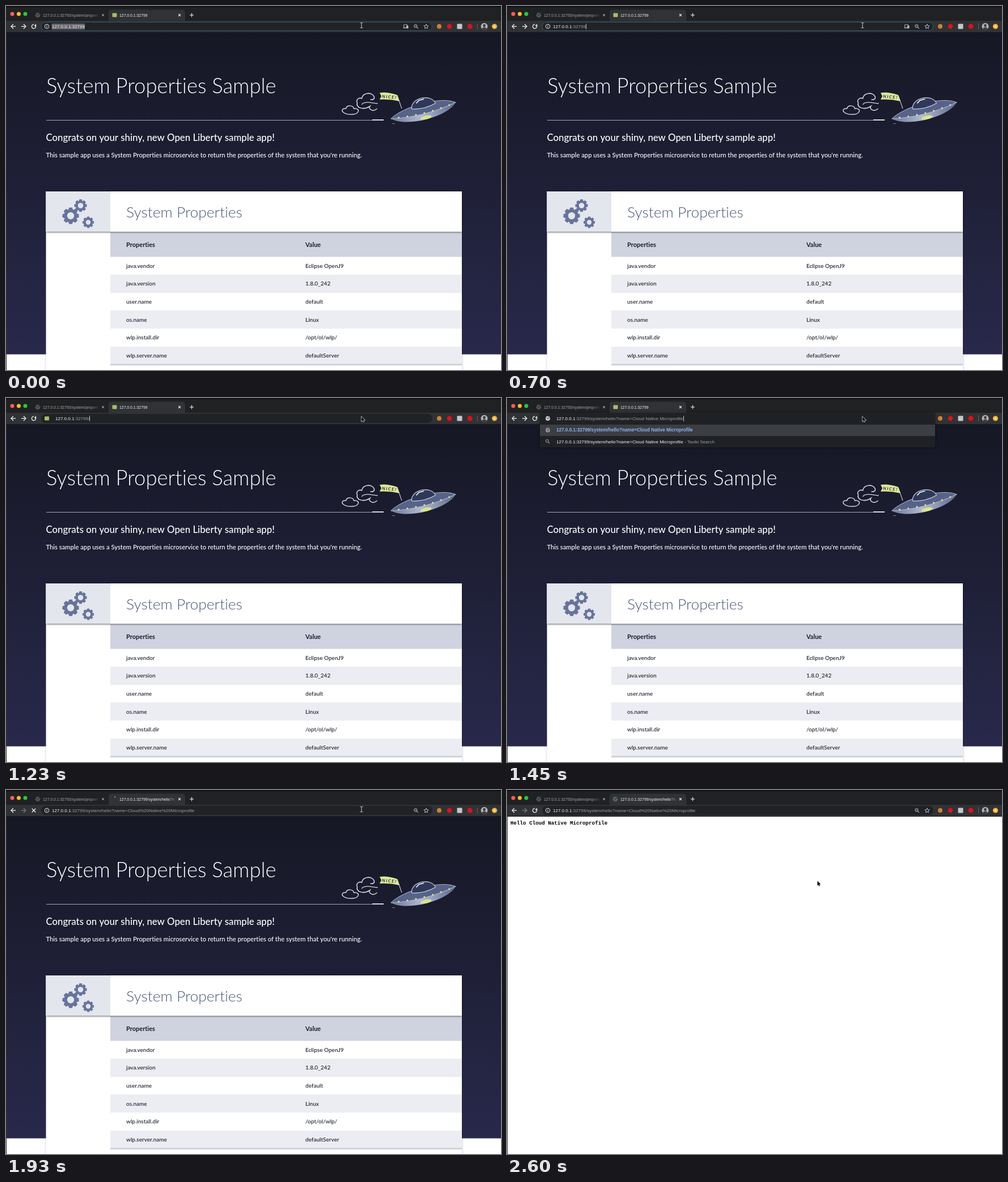
These frames come from a looping animation (873x642 px, 2650 ms). An HTML page with a canvas:

```html
<!DOCTYPE html>
<html lang="en">
<head>
<meta charset="utf-8">
<title>System Properties Sample</title>
<style>
  html, body { margin: 0; width: 100%; height: 100%; overflow: hidden; background: #fff; }
  canvas { display: block; }
</style>
</head>
<body>
<canvas id="stage" width="873" height="642"></canvas>
<script>
const W = 873, H = 642, LOOP = 2650;
const DESELECT = 680, SLASH = 1215, PASTE = 1440, ENTER = 1900, LOADED = 1950, DONE = 2100;
const MOVE_START = 2220, MOVE_END = 2570;
const HOST = '127.0.0.1', PORT = ':32799', PATH = '/system/hello?name=Cloud Native Microprofile';
const UI = '"Liberation Sans", Arial, sans-serif';
const BODY = 'Lato, "Open Sans", sans-serif';
const ctx = document.getElementById('stage').getContext('2d');
ctx.letterSpacing = '0.01px'; // turns ligatures off

function rect(x, y, w, h, color) {
  ctx.fillStyle = color;
  ctx.fillRect(x, y, w, h);
}

function pill(x, y, w, h, r, color) {
  ctx.beginPath();
  ctx.roundRect(x, y, w, h, r);
  ctx.fillStyle = color;
  ctx.fill();
}

function disc(x, y, r, color) {
  ctx.beginPath();
  ctx.arc(x, y, r, 0, Math.PI * 2);
  ctx.fillStyle = color;
  ctx.fill();
}

function ring(x, y, r, color, width = 1) {
  ctx.beginPath();
  ctx.arc(x, y, r, 0, Math.PI * 2);
  stroke(color, width);
}

function stroke(color, width = 1) {
  ctx.strokeStyle = color;
  ctx.lineWidth = width;
  ctx.stroke();
}

function line(points, color, width = 1) {
  ctx.beginPath();
  points.forEach(([x, y]) => ctx.lineTo(x, y));
  stroke(color, width);
}

// Draws a string and returns the x where it ends.
function text(str, x, y, font, color) {
  ctx.font = font;
  ctx.fillStyle = color;
  ctx.fillText(str, x, y);
  return x + ctx.measureText(str).width;
}

function fadeRight(x1, x2, color) {
  const g = ctx.createLinearGradient(x1, 0, x2, 0);
  g.addColorStop(0, color);
  g.addColorStop(1, color + '00');
  return g;
}

function cross(x, y, r, color, width) {
  line([[x - r, y - r], [x + r, y + r]], color, width);
  line([[x - r, y + r], [x + r, y - r]], color, width);
}

function globe(x, y, r, color, land) {
  disc(x, y, r, color);
  line([[x - r * .6, y - r * .3], [x, y], [x + r * .1, y + r * .6]], land, 1.1);
  line([[x + r * .2, y - r * .7], [x + r * .7, y - r * .1]], land, 1.1);
}

function magnifier(x, y, r, color) {
  ring(x - .7, y - .7, r, color, 1);
  line([[x + r * .5, y + r * .5], [x + r + 1.2, y + r + 1.2]], color, 1.1);
}

function star(x, y, r, color) {
  ctx.beginPath();
  for (let i = 0; i < 10; i++) {
    const a = -Math.PI / 2 + i * Math.PI / 5, d = i % 2 ? r * .45 : r;
    ctx.lineTo(x + d * Math.cos(a), y + d * Math.sin(a));
  }
  ctx.closePath();
  stroke(color, .9);
}

function navArrow(x, y, dir, color) {
  line([[x - 4 * dir, y], [x + 4 * dir, y]], color, 1.3);
  line([[x, y - 4], [x + 4 * dir, y], [x, y + 4]], color, 1.3);
}

function gear(x, y, r, hole) {
  ctx.save();
  ctx.translate(x, y);
  ctx.fillStyle = '#68739a';
  ctx.beginPath();
  ctx.arc(0, 0, r * .8, 0, Math.PI * 2);
  ctx.arc(0, 0, hole, 0, Math.PI * 2, true);
  ctx.fill();
  for (let i = 0; i < 8; i++) {
    ctx.beginPath();
    ctx.moveTo(-r * .27, -r * .72);
    ctx.lineTo(-r * .2, -r);
    ctx.lineTo(r * .2, -r);
    ctx.lineTo(r * .27, -r * .72);
    ctx.fill();
    ctx.rotate(Math.PI / 4);
  }
  ctx.restore();
}

function cloud() {
  ctx.save();
  ctx.translate(-1.5, 0);
  ctx.beginPath();
  ctx.moveTo(622, 187);
  ctx.bezierCurveTo(619, 193, 602, 192, 597, 188);
  ctx.bezierCurveTo(591, 184, 596, 180, 601, 181);
  ctx.bezierCurveTo(603, 174, 614, 175, 615, 181);
  ctx.bezierCurveTo(620, 180, 625, 183, 622, 187);
  stroke('#d4d6e2', 1.5);
  ctx.beginPath();
  ctx.moveTo(656, 181);
  ctx.bezierCurveTo(648, 188, 640, 181, 643, 177);
  ctx.bezierCurveTo(630, 185, 618, 178, 621, 171);
  ctx.bezierCurveTo(618, 165, 624, 161, 629, 163);
  ctx.bezierCurveTo(631, 152, 647, 152, 650, 159);
  ctx.bezierCurveTo(653, 163, 649, 166, 644, 165);
  stroke('#d4d6e2', 1.6);
  ctx.beginPath();
  ctx.moveTo(629, 174);
  ctx.bezierCurveTo(633, 167, 644, 171, 657, 172);
  stroke('#d4d6e2', 1.3);
  ctx.restore();
}

function flag() {
  line([[690, 158], [698, 181]], '#aeb6cc', 1.3);
  ctx.beginPath();
  ctx.moveTo(659, 153);
  ctx.quadraticCurveTo(673, 151, 690, 157);
  ctx.lineTo(694, 168);
  ctx.quadraticCurveTo(677, 164, 659, 165);
  ctx.lineTo(662, 159);
  ctx.closePath();
  ctx.fillStyle = '#dce897';
  ctx.fill();
  ctx.save();
  ctx.translate(663, 162);
  ctx.rotate(.08);
  text('N I C E !', 0, 0, `italic bold 7.5px ${BODY}`, '#25283d');
  ctx.restore();
}

function saucer() {
  ctx.save();
  ctx.translate(736, 185);
  ctx.rotate(-.24);

  const hull = ctx.createLinearGradient(-55, 0, 55, 0);
  hull.addColorStop(0, '#6f7ca0');
  hull.addColorStop(.45, '#b3bccf');
  hull.addColorStop(1, '#5d6990');
  ctx.beginPath();
  ctx.moveTo(-59, 0);
  ctx.bezierCurveTo(-35, -15, 32, -19, 59, -1);
  ctx.bezierCurveTo(42, 19, -32, 23, -59, 0);
  ctx.fillStyle = hull;
  ctx.fill();

  // The upper deck is the darker half, above the rim with the lights.
  ctx.beginPath();
  ctx.moveTo(-59, 0);
  ctx.bezierCurveTo(-35, -15, 32, -19, 59, -1);
  ctx.quadraticCurveTo(0, 11, -59, 0);
  ctx.fillStyle = '#56628a';
  ctx.fill();
  stroke('#a9b3c9', 1);

  ctx.beginPath();
  ctx.moveTo(-19, -8);
  ctx.bezierCurveTo(-18, -27, 20, -28, 24, -8);
  ctx.quadraticCurveTo(2, -2, -19, -8);
  ctx.fillStyle = '#2f3858';
  ctx.fill();
  stroke('#b3bccf', 1.4);
  line([[-9, -16], [-3, -20], [6, -20]], '#dce4ee', 1.8);

  for (let x = -45; x <= 47; x += 15.3) disc(x, 4 - x * x / 700, 1.5, '#e6ec72');
  ctx.beginPath();
  ctx.ellipse(2, 12.5, 10, 3.2, .02, 0, Math.PI * 2);
  ctx.fillStyle = '#dce68b';
  ctx.fill();
  ctx.restore();
}

function hero() {
  text('System Properties Sample', 71, 154, `300 36.4px ${BODY}`, '#fff');
  rect(71, 201, 595, 1, '#a5a6b5');
  rect(646, 200, 20, 2, '#d7d8e2');
  cloud();
  flag();
  saucer();
  rect(681, 207, 5, 1, '#777b95');
  text('Congrats on your shiny, new Open Liberty sample app!', 70.5, 238, `500 16.8px ${BODY}`, '#fff');
  text("This sample app uses a System Properties microservice to return the properties of the system that you're running.",
    70.5, 267, `500 11.2px ${BODY}`, '#fff');
}

const ROWS = [
  ['java.vendor', 'Eclipse OpenJ9'],
  ['java.version', '1.8.0_242'],
  ['user.name', 'default'],
  ['os.name', 'Linux'],
  ['wlp.install.dir', '/opt/ol/wlp/'],
  ['wlp.server.name', 'defaultServer'],
];

function panel() {
  ctx.save();
  ctx.shadowColor = 'rgba(0,0,0,.25)';
  ctx.shadowBlur = 4;
  rect(70.5, 327, 733.5, 330, '#fff');
  ctx.restore();

  rect(184, 399, 620, 43.5, '#cfd3e0');
  text('Properties', 212, 424.5, `bold 11px ${BODY}`, '#191b2b');
  text('Value', 528, 424.5, `bold 11px ${BODY}`, '#191b2b');
  ROWS.forEach(([name, value], i) => {
    const y = 442.5 + i * 31.6;
    if (i % 2) rect(184, Math.round(y), 620, 32, '#ecedf2');
    text(name, 212, y + 19.2, `500 10px ${BODY}`, '#1a1b29');
    text(value, 528, y + 19.2, `500 10px ${BODY}`, '#1a1b29');
  });
  rect(184, 631, 620, 3, '#cfd3e0');

  ctx.save();
  ctx.shadowColor = 'rgba(0,0,0,.65)';
  ctx.shadowBlur = 3;
  ctx.shadowOffsetY = 1;
  rect(70.5, 327, 733.5, 71, '#fff');
  ctx.restore();
  rect(70.5, 327, 113.5, 71, '#e4e6ee');
  gear(114, 370, 14.5, 6.2);
  gear(131.5, 352, 11, 4.8);
  gear(145, 381.5, 10, 4.2);
  text('System Properties', 212, 373, `300 26.4px ${BODY}`, '#4a5881');
}

function samplePage() {
  const sky = ctx.createLinearGradient(0, 47, 0, 614);
  sky.addColorStop(0, '#161724');
  sky.addColorStop(1, '#28294b');
  rect(0, 614, W, 28, '#fff');
  rect(0, 47, W, 567.4, sky);
  hero();
  panel();
}

function helloPage() {
  rect(0, 47, W, H - 47, '#fff');
  text('Hello Cloud Native Microprofile', 6, 61,
    'bold 9.2px "Liberation Mono", "Courier New", monospace', '#000');
}

function spinner(t) {
  const a = -Math.PI / 2, sweep = .2 + ((t - ENTER) / 75) % 4.5;
  ctx.beginPath();
  ctx.arc(191, 16, 4, a, a + sweep);
  stroke('#c3c6cb', 1.2);
}

function tabs(t) {
  const tabFont = `6.85px ${UI}`;
  rect(0, 0, W, 27, '#1f2123');
  rect(0, 0, W, 2, '#0d0e10');
  ['#ff5f57', '#febc2e', '#28c840'].forEach((c, i) => disc(11 + i * 11.5, 14, 3.5, c));

  globe(56, 16, 4.3, '#54575b', '#242629');
  ctx.save();
  ctx.beginPath();
  ctx.rect(60, 6, 103, 20);
  ctx.clip();
  text('127.0.0.1:32793/system/properties', 65, 18.7, tabFont, fadeRight(148, 166, '#a4a7ab'));
  ctx.restore();
  cross(171, 16, 2, '#b8babd', 1);

  pill(181, 6.5, 135, 24, 5, '#303235');
  if (t < ENTER) pill(187.5, 12.5, 8, 7, 1, '#a5bd6d');
  else if (t < DONE) spinner(t);
  else globe(191, 16, 4.3, '#63666a', '#2a2c2f');
  ctx.save();
  ctx.beginPath();
  ctx.rect(198, 6, 100, 20);
  ctx.clip();
  const title = HOST + PORT + (t < ENTER ? '' : PATH);
  text(title, 200, 18.7, tabFont, fadeRight(286, 301, '#f1f2f3'));
  ctx.restore();
  cross(306, 16, 2, '#e2e3e5', 1.1);
  line([[324, 16], [331, 16]], '#dfe1e4', 1.2);
  line([[327.5, 12.5], [327.5, 19.5]], '#dfe1e4', 1.2);
}

function reloadIcon(loading) {
  if (loading) return cross(49, 36, 3.2, '#f0f1f2', 1.4);
  ctx.beginPath();
  ctx.arc(49, 36, 3.6, -.6, Math.PI * 1.75 - .7);
  stroke('#f0f1f2', 1.3);
  ctx.beginPath();
  ctx.moveTo(53.2, 31.6);
  ctx.lineTo(53.2, 35.6);
  ctx.lineTo(49.2, 35.6);
  ctx.fillStyle = '#f0f1f2';
  ctx.fill();
}

function extensions() {
  disc(764, 36, 3.9, '#d58a3c');
  [[762.5, 35], [765.5, 36.5], [763.5, 38]].forEach(([x, y]) => disc(x, y, .6, '#6b3b17'));
  disc(782, 36, 4.3, '#d9141e');
  pill(795.5, 31.5, 9, 9, 1, '#c5c7ca');
  disc(818, 36, 4.5, '#d3131f');
  rect(831, 31, 1, 10, '#5d6064');

  ctx.save();
  ctx.beginPath();
  ctx.arc(843.5, 36, 6, 0, Math.PI * 2);
  ctx.clip();
  rect(837, 30, 13, 13, '#b4b4b4');
  disc(843.5, 34.5, 2.4, '#3c3c3d');
  disc(843.5, 42, 4.6, '#3c3c3d');
  ctx.restore();
  disc(861.5, 36, 4.6, '#efb63d');
  disc(861.5, 36, 1.6, '#fff0c4');
}

function infoIcon() {
  ring(72, 36, 3.8, '#e0e2e5', 1);
  rect(71.5, 35.3, 1, 2.7, '#e0e2e5');
  rect(71.5, 33.6, 1, 1, '#e0e2e5');
}

function suggestions() {
  const url = HOST + PORT + PATH;
  ctx.save();
  ctx.shadowColor = 'rgba(0,0,0,.5)';
  ctx.shadowBlur = 5;
  rect(58, 27, 697, 60, '#202124');
  ctx.restore();
  rect(58, 47, 697, 20, '#3b3e42');
  globe(72, 56.5, 3.9, '#999da2', '#3b3e42');
  text(url, 87, 59.4, `bold 8.15px ${UI}`, '#8ab4f8');
  magnifier(71.5, 76.5, 2.4, '#a9acb1');
  const end = text(url, 87, 79.6, `8px ${UI}`, '#f2f3f4');
  text(' - Tavilo Search', end, 79.6, `8px ${UI}`, '#9aa0a6');
}

function omnibox(t) {
  const editing = t >= SLASH && t < ENTER, focused = t < SLASH;
  const pasted = t >= PASTE && t < ENTER;
  const font = `8px ${UI}`, base = 39;
  pill(62, 28, 690, 16, 8, '#202225');
  if (focused) {
    ctx.beginPath();
    ctx.roundRect(62, 28.5, 689.5, 15, 7.5);
    stroke('#2f5c7b', 1);
  }
  if (pasted) suggestions();

  if (!editing) infoIcon();
  else if (pasted) globe(72, 36, 3.9, '#dadce0', '#303236');
  else pill(68, 32.5, 8, 7, 1, '#a5bd6d');

  const selected = t < DESELECT;
  if (selected) rect(80.5, 31, 58.5, 10.5, '#69656f');
  let rest = PORT;
  if (t >= ENTER) rest += PATH.replaceAll(' ', '%20');
  else if (pasted) rest += PATH;
  else if (editing) rest += '/';
  const hostEnd = text(HOST, editing ? 87 : 81, base, font, '#f4f5f6');
  const end = text(rest, hostEnd, base, font, selected ? '#f4f5f6' : '#9aa0a6');
  if (!selected && t < ENTER) rect(Math.round(end), 31.5, 1, 9.5, '#c2c4c7');

  if (editing) return;
  if (focused) {
    ctx.beginPath();
    ctx.rect(701.5, 33, 6, 5);
    stroke('#b9bcc0', .9);
    rect(700.5, 38.3, 5, 1, '#b9bcc0');
    pill(706, 34.5, 3.5, 5, .5, '#b9bcc0');
  }
  magnifier(723, 36, 2.6, '#c3c5c9');
  line([[721, 35.3], [723.6, 35.3]], '#c3c5c9', .7);
  star(741, 36.3, 4.3, '#c9cbcf');
}

function toolbar(t) {
  rect(0, 26, W, 20, '#303235');
  rect(0, 46, W, 1, '#191a1d');
  navArrow(13, 36, -1, '#f0f1f2');
  navArrow(31, 36, 1, t < ENTER ? '#f0f1f2' : '#777a7f');
  reloadIcon(t >= ENTER && t < DONE);
  extensions();
  omnibox(t);
}

function beam(x, y) {
  for (const [color, width] of [['#1a1b1d', 2.4], ['#d5d7da', 1]]) {
    line([[x, y - 4], [x, y + 4]], color, width);
    line([[x - 2.5, y - 5], [x, y - 4], [x + 2.5, y - 5]], color, width);
    line([[x - 2.5, y + 5], [x, y + 4], [x + 2.5, y + 5]], color, width);
  }
}

function arrow(x, y) {
  ctx.beginPath();
  [[0, 0], [0, 8], [1.8, 6.4], [3.1, 9.2], [4.3, 8.6], [3.1, 6], [5.7, 5.8]]
    .forEach(([dx, dy]) => ctx.lineTo(x + dx, y + dy));
  ctx.closePath();
  stroke('#e0e0e0', 1.3);
  ctx.fillStyle = '#050505';
  ctx.fill();
}

function pointer(t) {
  if (t >= SLASH && t < ENTER) return arrow(627, 33);
  if (t < MOVE_START) return beam(627, 34);
  const p = Math.min(1, (t - MOVE_START) / (MOVE_END - MOVE_START));
  const e = p * p * (3 - 2 * p);
  const x = 627 - 79.5 * e, y = 34 + 126.5 * e;
  if (y < 46) beam(x, y);
  else arrow(x, y);
}

function draw(t) {
  ctx.clearRect(0, 0, W, H);
  if (t < LOADED) samplePage();
  else helloPage();
  tabs(t);
  toolbar(t);
  rect(0, 26, 1, H - 26, '#2c2d33');
  pointer(t);
}

function tick() {
  draw(performance.now() % LOOP);
  requestAnimationFrame(tick);
}
tick();
</script>
</body>
</html>
```
